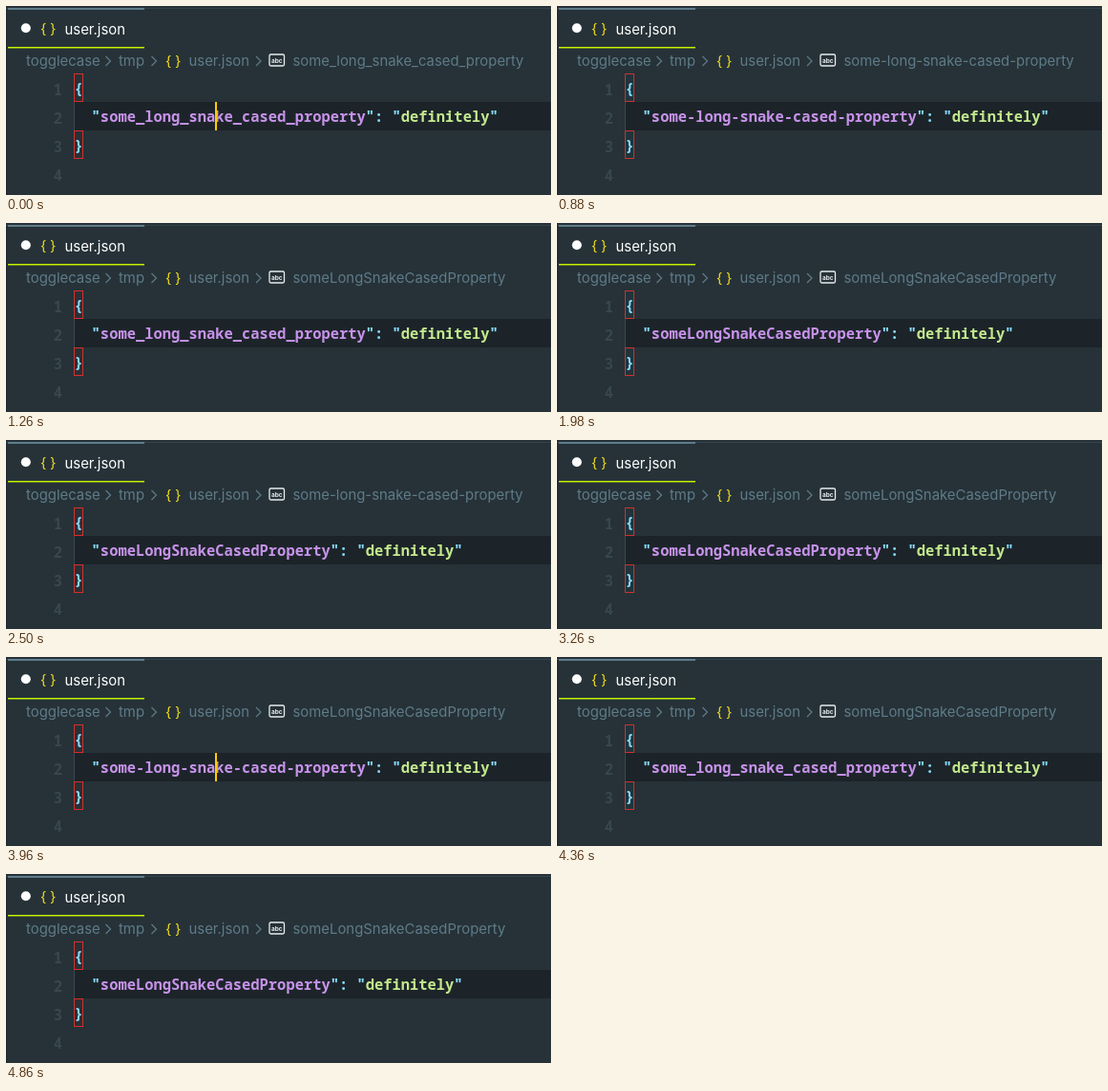
An HTML page with a canvas for the animation above (4.96 s loop, 571 by 199 pixels).

```html
<!DOCTYPE html>
<html lang="en">
<head>
<meta charset="utf-8">
<title>Case toggling in an editor</title>
<style>
  html, body { margin: 0; width: 100%; height: 100%; overflow: hidden; background: #263238; }
  canvas { display: block; width: 571px; height: 199px; }
</style>
</head>
<body>
<canvas id="stage"></canvas>
<script>
const W = 571, H = 199, LOOP = 4960, BLINK = 300;
const MONO = '"Noto Sans Mono", "DejaVu Sans Mono", monospace';
const CODE = `700 15.44px ${MONO}`;
const UI = '14.9px Inter, Roboto, sans-serif';
const CYAN = '#89ddff', PURPLE = '#c792ea', GREEN = '#c3e88d';
const YELLOW = '#f7e01c', MUTED = '#5f7b88', ICON = '#e6edf0';
const ROW_TOP = 71, ROW_H = 30;

const words = ['some', 'long', 'snake', 'cased', 'property'];
const capital = w => w[0].toUpperCase() + w.slice(1);
const styles = [
  words.join('_'),
  words.join('-'),
  words[0] + words.slice(1).map(capital).join('')
];

// Each edit advances snake -> kebab -> camel; the breadcrumb follows later.
const edits = [660, 980, 1220, 1560, 1760, 2020, 2240, 2500, 2720, 2880,
               3060, 3700, 3880, 4040, 4360, 4560, 4720];
const crumbs = [[0, 0], [880, 1], [1180, 2], [1460, 0], [1980, 2],
                [2220, 0], [2460, 1], [3260, 2]];

const canvas = document.getElementById('stage');
const ctx = canvas.getContext('2d');
const scale = window.devicePixelRatio || 1;
canvas.width = W * scale;
canvas.height = H * scale;
ctx.scale(scale, scale);

function rect(x, y, w, h, color) {
  ctx.fillStyle = color;
  ctx.fillRect(x, y, w, h);
}

function text(str, x, y, color, font) {
  ctx.font = font;
  ctx.fillStyle = color;
  ctx.fillText(str, x, y);
  return x + ctx.measureText(str).width;
}

function chevron(x) {
  ctx.strokeStyle = MUTED;
  ctx.lineWidth = 1.2;
  ctx.beginPath();
  ctx.moveTo(x, 53);
  ctx.lineTo(x + 5, 58);
  ctx.lineTo(x, 63);
  ctx.stroke();
}

function braces(x, y) {
  const font = `500 14px ${MONO}`;
  text('{', x - 2, y, YELLOW, font);
  text('}', x + 8, y, YELLOW, font);
}

function drawTab() {
  rect(0, 2, W, 1, '#34444c');
  rect(2, 2, 143, 2, '#607d8b');
  ctx.fillStyle = '#fff';
  ctx.beginPath();
  ctx.arc(20.8, 23.3, 5, 0, Math.PI * 2);
  ctx.fill();
  braces(37, 28);
  text('user.json', 61.5, 29.5, '#fff', UI);
  rect(2, 43, 143, 1.5, '#c6f000');
}

function drawCrumbs(name) {
  text('togglecase', 21, 63, MUTED, UI);
  chevron(104.5);
  text('tmp', 118, 63, MUTED, UI);
  chevron(152.5);
  braces(168, 61.5);
  text('user.json', 191.5, 63, MUTED, UI);
  chevron(262);
  ctx.strokeStyle = ICON;
  ctx.lineWidth = 1.3;
  ctx.beginPath();
  ctx.roundRect(276, 51, 15.5, 12, 1.5);
  ctx.stroke();
  text('abc', 278, 59.7, ICON, '700 6.5px Inter, sans-serif');
  text(name, 300.5, 63, MUTED, UI);
}

function drawBrace(mark, row) {
  const top = ROW_TOP + row * ROW_H;
  ctx.strokeStyle = '#d5302b';
  ctx.lineWidth = 1;
  ctx.strokeRect(71.5, top + 0.5, 9, ROW_H - 1);
  text(mark, 71.4, top + 21.5, CYAN, CODE);
}

function drawCode(name, cursor) {
  const top = ROW_TOP + ROW_H;
  rect(72, top, W - 72, ROW_H, '#1c2429');
  rect(71, top, 1, ROW_H, '#3a484f');
  for (let i = 0; i < 4; i++) {
    text(String(i + 1), 49.8, 93.5 + ROW_H * i, '#38474f', CODE);
  }
  drawBrace('{', 0);
  drawBrace('}', 2);
  const parts = [['"', CYAN], [name, PURPLE], ['": "', CYAN],
                 ['definitely', GREEN], ['"', CYAN]];
  let x = 89.6;
  for (const [str, color] of parts) x = text(str, x, top + 20.6, color, CODE);
  if (cursor) rect(219, top, 2, ROW_H, '#ffcc00');
}

function draw(t) {
  const style = edits.filter(at => at <= t).length % styles.length;
  const crumb = crumbs.filter(([at]) => at <= t).pop()[1];
  const cursor = Math.floor((t + 240) / BLINK) % 2 === 0;
  rect(0, 0, W, H, '#263238');
  rect(0, 0, 1, H, '#1b2428');
  drawTab();
  drawCrumbs(styles[crumb]);
  drawCode(styles[style], cursor);
}

const start = performance.now();
function frame() {
  draw((performance.now() - start) % LOOP);
  requestAnimationFrame(frame);
}
draw(0);
requestAnimationFrame(frame);
</script>
</body>
</html>
```
